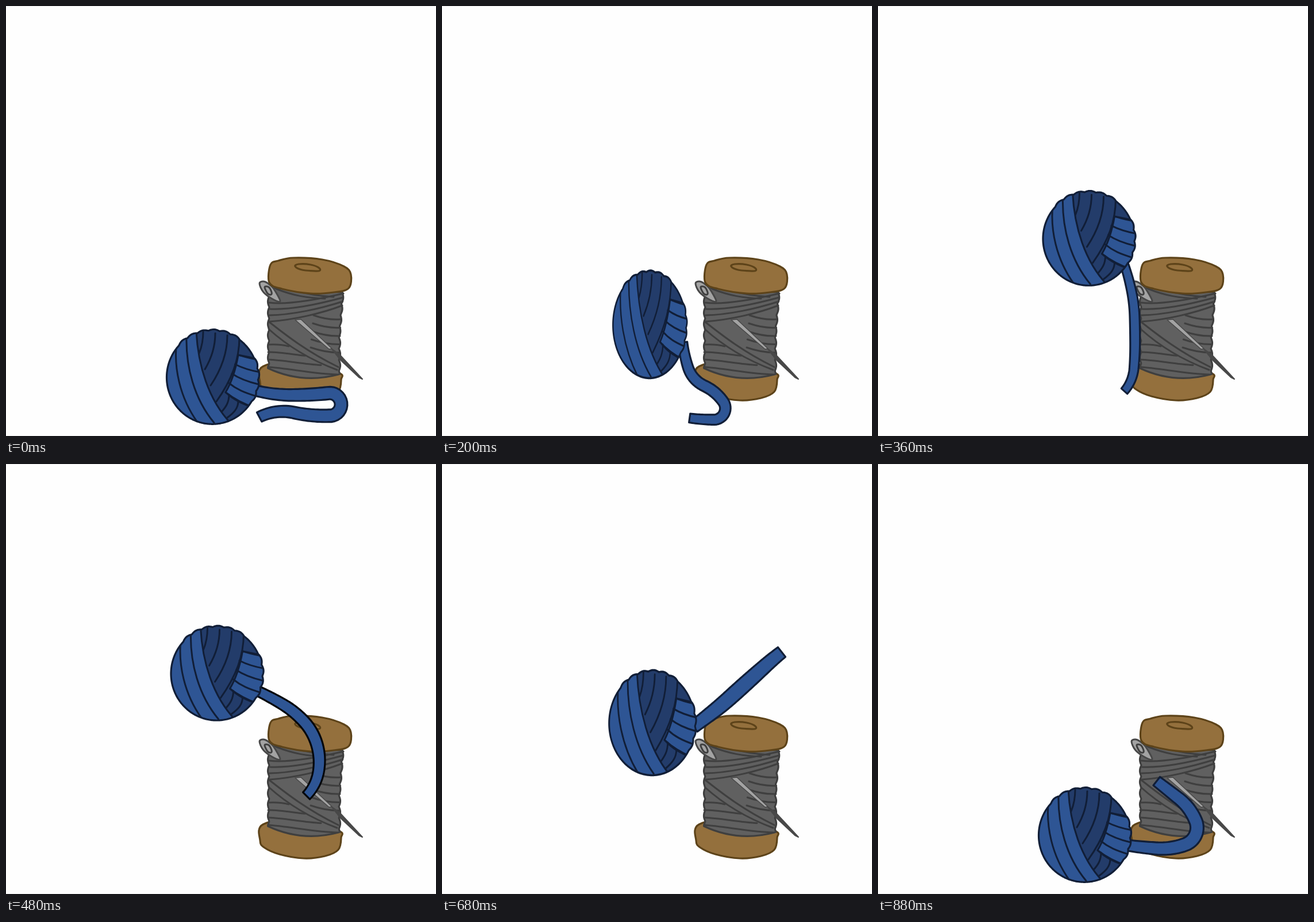
Recreate the animation shown at these times as an HTML page with a canvas. Size 748 px wide and 748 px high, loop 0.92 s.

```html
<!DOCTYPE html>
<html lang="en">
<head>
<meta charset="utf-8">
<title>Yarn ball and spool</title>
<style>
  html, body { margin: 0; width: 100%; height: 100%; overflow: hidden; background: #fefefe; }
  canvas { display: block; width: 100vw; height: 100vh; }
</style>
</head>
<body>
<canvas id="stage" width="748" height="748"></canvas>
<script>
const ctx = document.getElementById('stage').getContext('2d');
const LOOP = 920, STEP = 40, RAD = Math.PI / 180;
const WOOD = '#94703d', WOOD_LINE = '#5d4319', GREY = '#606060', GREY_LINE = '#3f3f3f';
const STEEL = '#a3a3a3', STEEL_LINE = '#484848';
const BLUE = '#2e5594', NAVY = '#233c6a', INK = '#111e37';

const lerp = (a, b, k) => a + (b - a) * k;
const mix = (a, b, k) => a.map((v, i) => lerp(v, b[i], k));
const ramp = (a, b, t) => Math.max(0, Math.min(1, (t - a) / (b - a)));
const nums = s => s.split(/[ ,]+/).map(Number);

// Smooth closed outline through a few points
function blob(s) {
  const v = nums(s), n = v.length / 2, path = new Path2D();
  const at = i => v.slice((i + n) % n * 2, (i + n) % n * 2 + 2);
  path.moveTo(...at(0));
  for (let i = 0; i < n; i++) {
    const [a, b, c, d] = [at(i - 1), at(i), at(i + 1), at(i + 2)];
    path.bezierCurveTo(b[0] + (c[0] - a[0]) / 6, b[1] + (c[1] - a[1]) / 6,
      c[0] - (d[0] - b[0]) / 6, c[1] - (d[1] - b[1]) / 6, ...c);
  }
  path.closePath();
  return path;
}

// n strands blended from one cubic to another
function fan(first, last, n) {
  const path = new Path2D();
  for (let i = 0; i < n; i++) {
    const [x, y, ...c] = mix(nums(first), nums(last), n > 1 ? i / (n - 1) : 0);
    path.moveTo(x, y);
    path.bezierCurveTo(...c);
  }
  return path;
}

function paint(path, fill, line, width = 3.2) {
  if (fill) { ctx.fillStyle = fill; ctx.fill(path); }
  if (line) { ctx.strokeStyle = line; ctx.lineWidth = width; ctx.stroke(path); }
}

// Wound thread: both edges ripple, the lower end sags
function threadBody() {
  const path = new Path2D(), ripple = y => 2.5 * Math.abs(Math.sin((y - 485) / 15 * Math.PI / 1.3));
  for (let y = 490; y <= 630; y += 2) path.lineTo(458 - ripple(y), y);
  path.quadraticCurveTo(515, 658, 578, 641);
  for (let y = 640; y >= 498; y -= 2) path.lineTo(lerp(585, 579, ramp(498, 570, y)) + ripple(y + 6), y);
  path.closePath();
  return path;
}

const spool = {
  base: blob('447,627 442,655 449,667 476,679 518,686 555,682 578,671 583,650 579,638 515,616'),
  baseRim: fan('445,634 455,666 545,664 583,648', '', 1),
  thread: threadBody(),
  wraps: [
    fan('458,516 490,520 540,511 587,500', '458,549 500,546 548,535 585,521', 4),
    fan('470,492 500,504 525,508 555,509', '498,494 520,500 545,505 570,506', 2),
    fan('535,538 555,545 570,546 582,545', '530,594 550,601 565,603 580,603', 5),
    fan('457,549 490,575 525,602 578,628', '457,562 488,590 525,614 576,633', 2),
    fan('456,589 472,588 480,589 492,592', '456,628 490,630 535,640 576,641', 4)
  ],
  side: blob('460,450 458,481 480,492 530,500 570,498 596,491 600,467 588,453 550,441 500,438 474,443'),
  rim: fan('460,451 470,490 565,494 600,468', '', 1),
  hole: blob('503,453 509,449 530,450 545,456 543,461 515,459')
};

const needle = {
  head: blob('441,483 447,479 455,482 465,491 477,513 466,511 448,498'),
  eye: blob('450,489 457,489 462,498 461,502 455,500'),
  shaft: new Path2D('M503 546L513 545L567 596L562 597Z'),
  tip: new Path2D('M566 596L580 606L620 649L614 646L582 616Z')
};

// Ball around (0, 0): an ellipse whose rim swells at the strand ends
const BUMP = 14, FIRST = -137;
function ballBody() {
  const path = new Path2D();
  for (let a = -180; a < 180; a++) {
    const swollen = (a > FIRST && a < -53) || (a > -25 && a < 31);
    const r = swollen ? 2.2 * Math.abs(Math.sin((a - FIRST) / BUMP * Math.PI)) : 0;
    path.lineTo((79.5 + r) * Math.cos(a * RAD), (81.3 + r) * Math.sin(a * RAD));
  }
  path.closePath();
  return path;
}

const ball = {
  body: ballBody(),
  left: new Path2D('M-28 -80C-25 -21 -7 39 32 80L-90 90L-90 -90Z'),
  right: new Path2D('M45 -39Q38 1 23 26Q45 43 72 52L95 20L90 -30Z'),
  strands: [
    fan('-62,-64 -68,-16 -56,36 -26,78', '-28,-80 -25,-21 -7,39 32,80', 3),
    fan('-80,-8 -78,10 -74,28 -64,46', '', 1),
    fan('-16,-80 -16,-66 -18,-54 -23,-42', '47,-70 47,-31 34,4 7,42', 4),
    fan('45,-39 55,-36 66,-32 86,-30', '23,26 38,40 52,46 74,54', 5),
    fan('29,30 29,44 23,52 16,60', '45,41 45,54 37,62 26,70', 2)
  ]
};

// Squash on the ground, a quick rise, a slower fall
function ballAt(t) {
  const squash = t < 160 ? Math.sin(t / 160 * Math.PI) ** 2 : 0;
  if (t < 160) return { squash, x: 359 + 2.5 * squash, y: 646 + 34 * squash, sx: 1 + .38 * squash, sy: 1 - .38 * squash };
  const rise = 1 - ramp(200, 360, t), fall = Math.sin(ramp(560, 880, t) * Math.PI);
  const y = 364 + (t < 480 ? .00215 * (498 - t) ** 2 : .0018 * (t - 460) ** 2);
  return {
    squash,
    x: 366.5 - 5.5 * rise - 7.5 * ramp(560, 880, t) ** 2,
    y: Math.min(646, y),
    sx: 1 - .2 * rise - .065 * fall,
    sy: 1 + .137 * rise + .12 * fall
  };
}

// Tail as a chain: time, width, length, anchor angle on the ball, headings along it
const REST = [22, 318, 17, 14, 0, -6, 178, 192, 152];
const tail = [
  [0, ...REST],
  [120, ...REST],
  [200, 19, 218, 20, 84, 72, 25, 55, 180, 188],
  [360, 17, 226, 36, 72, 78, 88, 90, 95, 132],
  [560, 23, 248, 14, -5, -1, 20, 64, 104, 137],
  [680, 26, 201, 4, -37, -38, -42, -42, -42, -38],
  [880, 23, 250, 13, 8, 4, -20, -112, -142, -142]
];

function tailPath(t, b) {
  const i = tail.findLastIndex(k => k[0] <= t), from = tail[i], to = tail[i + 1] || from;
  const [, width, length, anchor, ...turns] = mix(from, to, ramp(from[0], to[0] + 1e-6, t));
  const angle = (anchor - 24 * b.squash) * RAD, N = 80, path = new Path2D(), back = [];
  let x = b.x + 77 * b.sx * Math.cos(angle), y = b.y + 77 * b.sy * Math.sin(angle);
  for (let j = 0; j <= N; j++) {
    const u = j / N * (turns.length - 1), k = Math.min(turns.length - 2, Math.floor(u));
    const h = lerp(turns[k], turns[k + 1], u - k) * RAD;
    const half = width / 2 * (.82 + .18 * Math.sin(j / N * Math.PI));
    const nx = -Math.sin(h) * half, ny = Math.cos(h) * half;
    path.lineTo(x + nx, y + ny);
    back.unshift([x - nx, y - ny]);
    x += Math.cos(h) * length / N;
    y += Math.sin(h) * length / N;
  }
  back.forEach(p => path.lineTo(...p));
  path.closePath();
  return path;
}

function drawSpool() {
  paint(spool.base, WOOD, WOOD_LINE);
  paint(spool.baseRim, null, WOOD_LINE);
  paint(spool.thread, GREY, GREY_LINE);
  spool.wraps.forEach(w => paint(w, null, GREY_LINE, 3));
  paint(needle.head, STEEL, STEEL_LINE, 3);
  paint(needle.eye, STEEL, GREY_LINE, 3);
  paint(needle.shaft, STEEL, STEEL_LINE, 1.5);
  paint(needle.tip, STEEL_LINE, STEEL_LINE, 2);
  paint(spool.side, WOOD, WOOD_LINE);
  paint(spool.rim, null, WOOD_LINE);
  paint(spool.hole, null, WOOD_LINE);
}

function drawBall({ x, y, sx, sy }) {
  ctx.save();
  ctx.translate(x, y);
  ctx.scale(sx, sy);
  ctx.save();
  ctx.clip(ball.body);
  paint(ball.body, NAVY);
  paint(ball.left, BLUE);
  paint(ball.right, BLUE, INK, 3);
  ball.strands.forEach(s => paint(s, null, INK, 3));
  ctx.restore();
  paint(ball.body, null, INK);
  ctx.restore();
}

function draw(now) {
  let t = Math.floor(now % LOOP / STEP) * STEP;
  if (t === 720) t = 680; // this pose is held twice as long
  ctx.fillStyle = '#fefefe';
  ctx.fillRect(0, 0, 748, 748);
  ctx.fillStyle = '#f0f0f0';
  ctx.fillRect(0, 0, 748, 1);
  ctx.fillRect(0, 747, 748, 1);
  const b = ballAt(t);
  drawSpool();
  paint(tailPath(t, b), BLUE, t >= 480 && t <= 600 ? '#05070b' : INK);
  drawBall(b);
}

ctx.lineCap = ctx.lineJoin = 'round';
const start = performance.now();
function tick() {
  draw(performance.now() - start);
  requestAnimationFrame(tick);
}
tick();
</script>
</body>
</html>
```
